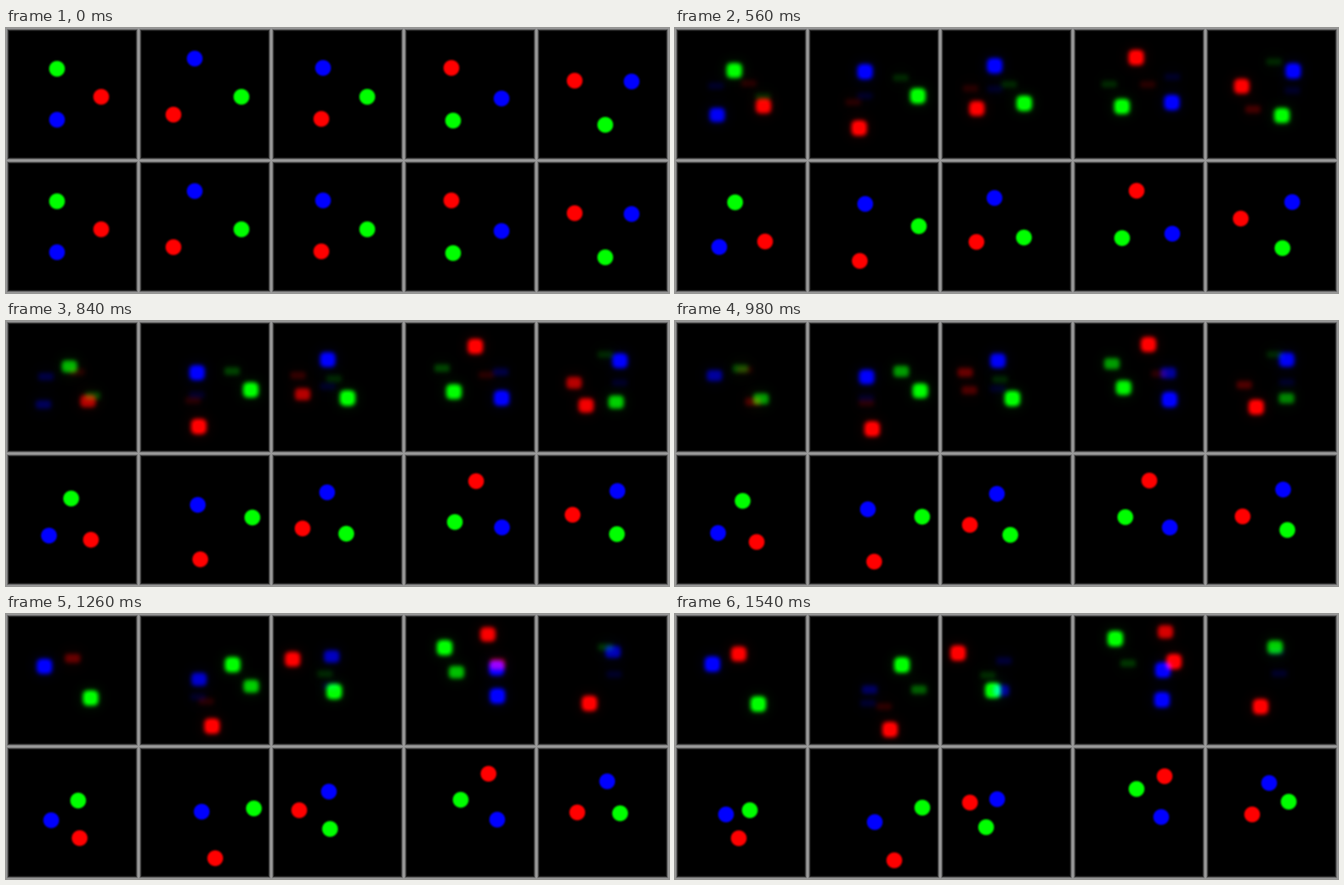
An HTML page with a canvas for the animation above (1.68 s loop, 780 by 312 pixels).

```html
<!DOCTYPE html>
<html lang="en">
<head>
<meta charset="utf-8">
<title>Three-body motion: prediction above, truth below</title>
<style>
html, body { margin: 0; width: 100%; height: 100%; overflow: hidden; background: #000; }
canvas { display: block; }
</style>
</head>
<body>
<canvas width="780" height="312"></canvas>
<script>
const ctx = document.querySelector('canvas').getContext('2d');
const CELL = 156, STEP_MS = 140, STEPS = 12, LAST = STEPS - 1;
const GRAVITY = 1000;
const RED = '255,0,0', GREEN = '0,255,0', BLUE = '0,0,255';

const mix = (a, b, part) => a.map((v, i) => v + (b[i] - v) * part);

// The true ball moves between `from` and `to`. Its prediction heads for `aim`
// and fades out at step `fades`, while an echo glides along and lights up at `rises`.
function ball(color, from, to, aim, fades, echoFrom, echoTo, rises) {
  const path = Array.from({ length: STEPS }, (_, k) => mix(from, to, k / LAST));
  return { color, path, aim, fades, echoFrom, echoTo, rises };
}

function pull([x, y], [otherX, otherY]) {
  const dx = otherX - x, dy = otherY - y;
  const scale = GRAVITY / Math.hypot(dx, dy) ** 3;
  return [dx * scale, dy * scale];
}

// Bend the straight paths of three balls until they obey mutual gravity.
function orbit(...trio) {
  for (let pass = 0; pass < 250; pass++) {
    for (let k = 1; k < LAST; k++) {
      for (const { path } of trio) {
        const forces = trio.filter(o => o.path !== path).map(o => pull(path[k], o.path[k]));
        path[k] = [0, 1].map(i =>
          (path[k - 1][i] + path[k + 1][i] - forces[0][i] - forces[1][i]) / 2);
      }
    }
  }
  return trio;
}

const balls = [
  orbit(
    ball(GREEN, [60, 48], [88, 75], [87, 70], 7.5, [106, 70], [98, 106], 7),
    ball(RED, [112, 81], [75, 108], [67, 92], 7.5, [92, 73], [75, 47], 9.5),
    ball(BLUE, [60, 108], [60, 80], [29, 84], 6.5, [50, 72], [44, 59], 7)),
  orbit(
    ball(BLUE, [222, 36], [235, 89], [229, 89], 12, [222, 69], [227, 105], 13),
    ball(RED, [197, 102], [258, 134], [253, 136], 40, [194, 78], [246, 109], 13),
    ball(GREEN, [277, 81], [291, 72], [287, 89], 12, [265, 58], [267, 60], 7)),
  orbit(
    ball(BLUE, [373, 47], [379, 62], [387, 55], 11.5, [373, 64], [384, 90], 11),
    ball(GREEN, [425, 81], [366, 95], [374, 90], 40, [404, 64], [368, 72], 14),
    ball(RED, [371, 107], [347, 66], [339, 58], 7.5, [354, 82], [333, 46], 7.5)),
  orbit(
    ball(RED, [524, 47], [576, 35], [577, 21], 15, [543, 71], [587, 56], 9),
    ball(GREEN, [526, 109], [543, 50], [533, 58], 11.5, [508, 82], [518, 29], 7),
    ball(BLUE, [583, 83], [572, 83], [573, 101], 40, [590, 54], [574, 66], 7)),
  orbit(
    ball(RED, [669, 62], [679, 80], [680, 86], 7.5, [676, 90], [689, 109], 5),
    ball(BLUE, [736, 63], [699, 43], [708, 45], 11.3, [733, 75], [711, 70], 14),
    ball(GREEN, [705, 114], [722, 65], [725, 70], 8, [704, 40], [706, 39], 10.5))
].flat();

function drawBall(color, [x, y]) {
  const edge = ctx.createRadialGradient(x, y, 0, x, y, 11.5);
  [[.6, 1], [.7, .88], [.8, .5], [.9, .13], [1, 0]].forEach(([stop, alpha]) =>
    edge.addColorStop(stop, `rgba(${color},${alpha})`));
  ctx.fillStyle = edge;
  ctx.fillRect(x - 12, y - 12, 24, 24);
}

function drawBlur(color, [x, y], w, h, alpha, blur) {
  ctx.filter = `blur(${blur}px)`;
  ctx.fillStyle = `rgba(${color},${alpha})`;
  ctx.beginPath();
  ctx.roundRect(x - w / 2, y - h / 2, w, h, Math.min(w, h) * .3);
  ctx.fill();
  ctx.filter = 'none';
}

// Weak ghosts are flatter as well as dimmer.
function drawGhost(color, point, strength) {
  if (strength <= 0) return;
  drawBlur(color, point, 18, 6 + 12 * strength, strength, 2.4);
  drawBlur(color, point, 26, 26, .07 * strength, 6);
}

function predictedPoint({ path, aim }, step) {
  const [start, second] = path;
  return start.map((v, i) => {
    const speed = second[i] - v;
    return v + speed * step + (aim[i] - v - speed * LAST) * (step / LAST) ** 2;
  });
}

function drawPrediction(b, step) {
  drawGhost(b.color, predictedPoint(b, step), 1 - (step / b.fades) ** 5);
  const glow = .15 + .85 / (1 + Math.exp(2 * (b.rises - step)));
  drawGhost(b.color, mix(b.echoFrom, b.echoTo, (step - 1) / (LAST - 1)), glow);
}

function drawGrid() {
  ctx.fillStyle = '#999';
  ctx.fillRect(0, 0, 780, 312);
  for (let x = 0; x < 780; x += CELL) {
    for (let y = 0; y < 312; y += CELL) {
      [.2, .5, .75, 1].forEach((alpha, i) => {
        const inset = i + 1, size = CELL - 2 * inset;
        ctx.fillStyle = `rgba(0,0,0,${alpha})`;
        ctx.fillRect(x + inset, y + inset, size, size);
      });
    }
  }
}

function draw(step) {
  ctx.globalCompositeOperation = 'source-over';
  drawGrid();
  ctx.globalCompositeOperation = 'lighter';
  for (const b of balls) {
    const [x, y] = b.path[step];
    drawBall(b.color, [x, y + CELL]);
    if (step === 0) drawBall(b.color, [x, y]);
    else drawPrediction(b, step);
  }
}

const start = performance.now();
function loop() {
  draw(Math.floor((performance.now() - start) / STEP_MS) % STEPS);
  requestAnimationFrame(loop);
}
loop();
</script>
</body>
</html>
```
